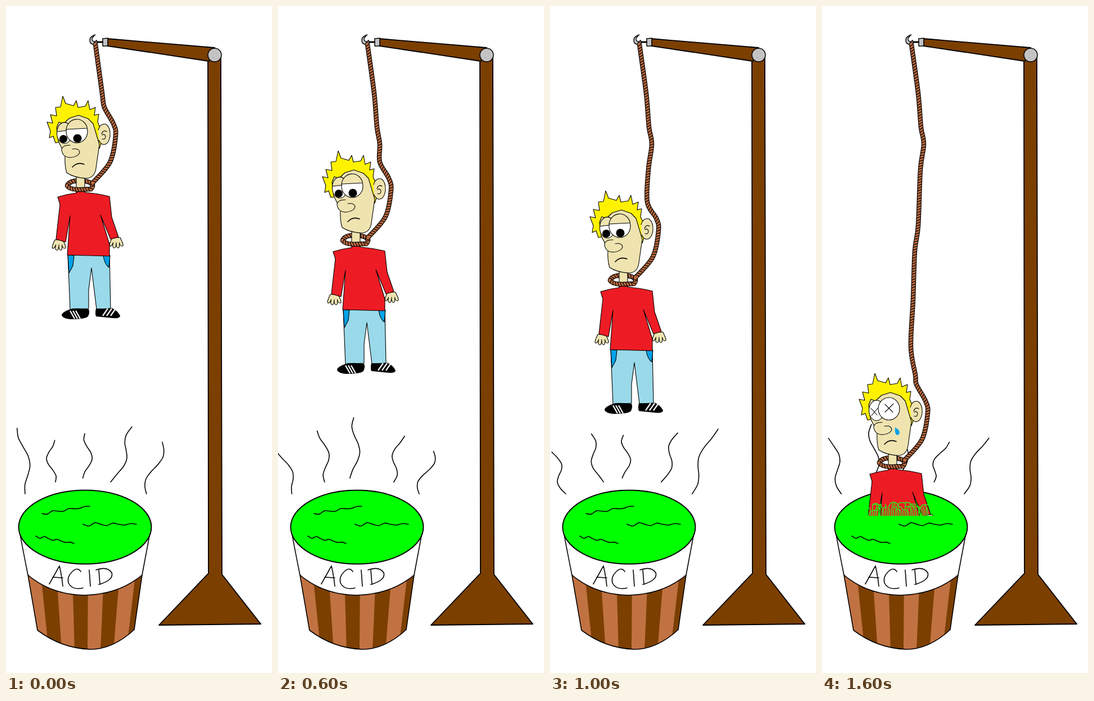
Recreate the animation shown at these times as an HTML page. Size 473 by 1184 pixels, loop 1.8 s.

```html
<!DOCTYPE html>
<html lang="en">
<head>
<meta charset="utf-8">
<title>Acid bucket</title>
<style>
  html, body { margin: 0; width: 100%; height: 100%; overflow: hidden; background: #fff; }
  svg { display: block; width: 100vw; height: 100vh; }
  .ink { fill: none; stroke: #000; stroke-width: 1.6; stroke-linecap: round; stroke-linejoin: round; }
  .thin { stroke: #000; stroke-width: 1.1; stroke-linejoin: round; stroke-linecap: round; }
  .post { fill: #7b3f00; stroke: #000; stroke-width: 1.8; stroke-linejoin: round; }
  .steel { fill: #c3c3c3; stroke: #000; stroke-width: 1.5; }
  .skin { fill: #efe4b0; }
  .none { fill: none; }
</style>
</head>
<body>
<svg viewBox="0 0 473 1184" preserveAspectRatio="none">
  <defs>
    <clipPath id="dip"><rect x="0" y="100" width="300" height="313"/></clipPath>
    <clipPath id="wood"><path d="M39 1010Q80 1045 140 1046Q202 1044 242 1010L228 1107Q190 1142 150 1142Q98 1140 56 1108Z"/></clipPath>
  </defs>

  <g id="gallows">
    <path class="post" d="M359 90H382L384 1009L453 1097L272 1099L360 1007Z"/>
    <path class="post" d="M181 58L371 74L361 98L181 71Z"/>
    <circle class="steel" cx="371" cy="87" r="12"/>
    <path class="steel" d="M172 58L181 57V71H172Z"/>
    <path d="M162 64H172" stroke="#000" stroke-width="3"/>
    <path class="steel" d="M159 51Q146 55 150 65Q156 72 163 65L161 61Q156 66 153 60Q153 55 159 51Z"/>
  </g>

  <path id="steam" class="ink"/>

  <g id="bucket">
    <path d="M23 925L39 1010Q80 1045 140 1046Q202 1044 242 1010L258 925Z" fill="#fff"/>
    <g id="staves" clip-path="url(#wood)"><rect x="30" y="1000" width="220" height="150" fill="#c17242"/></g>
    <path class="ink" d="M39 1010Q80 1045 140 1046Q202 1044 242 1010"/>
    <path class="ink" d="M23 925Q25 940 39 1010L56 1108Q98 1140 150 1142Q190 1142 228 1107L242 1010L258 925"/>
    <ellipse cx="140.5" cy="925" rx="118" ry="65.5" fill="#0f0" stroke="#000" stroke-width="1.9"/>
    <path id="wave" class="ink"/>
    <path id="ripples" class="ink"/>
    <path class="ink" role="img" aria-label="ACID" d="M77 1026L95 994Q99 1010 101 1030M83 1014L101 1015
      M133 1004Q128 996 120 1002Q108 1012 111 1024Q118 1038 137 1033M148 1001L150 1030
      M165 1001L167 1026M160 1001Q180 994 188 1006Q192 1019 165 1027"/>
  </g>

  <g id="man">
    <g id="backLoop"></g>
    <g id="body">
      <path id="hands" class="skin thin"/>
      <path class="thin" fill="#99d9ea" d="M110 442L114 539L147 537V503L152 465L161 538L186 537L184 442Z"/>
      <path class="thin" fill="#00a2e8" d="M110 442L121 443L119 461L112 474ZM173 443H185L183 464Q175 458 173 443Z"/>
      <path d="M147 538Q130 536 118 537Q99 543 99 549Q102 556 118 556Q138 556 145 552Q150 545 147 538Z
        M160 537Q158 545 160 551L190 554Q203 555 203 550Q199 541 188 536Q174 538 160 537Z"/>
      <path id="laces" stroke="#fff" stroke-width="2.2"/>
      <path class="skin thin" d="M125 300V333H140V300Z"/>
      <path class="thin" fill="#ed1c24" d="M92 339Q108 334 124 332L128 329H138L141 331Q164 333 184 338L188 375L200 410L186 414L168 371L184 423V444L109 442L114 372L106 419L89 414L96 352Z"/>
    </g>
    <path class="thin" fill="#fff200" d="M88 243L84 231L77 234L79 222L73 206L83 208L79 193L90 195L88 180L97 179L101 160L106 173L120 177L125 168L128 180L141 178L146 168L149 184L159 180L157 194L165 192L163 206L168 218L171 238L166 253L157 230Z"/>
    <path class="skin thin" d="M90 216L94 206L102 209L113 199L129 194L146 200L155 209L166 246L160 288Q158 304 144 306Q121 305 108 296Q104 284 105 264L93 240Z"/>
    <path class="skin thin" d="M164 220Q168 207 178 210Q186 216 185 230Q183 246 173 246Q167 244 165 238"/>
    <path class="thin none" d="M170 227Q173 219 179 223M171 236Q177 238 177 231Q175 226 171 229"/>
    <g class="thin">
      <ellipse cx="104" cy="226" rx="13.5" ry="18" fill="#fff"/>
      <path class="skin lids" d="M90.5 223A13.5 18 0 0 1 117 220Z"/>
      <circle class="lids" cx="102" cy="236" r="6.5"/>
      <ellipse cx="126" cy="223" rx="19" ry="20" fill="#fff"/>
      <path class="skin lids" d="M107 219A19 20 0 0 1 144.5 217Z"/>
      <circle class="lids" cx="127" cy="235" r="7"/>
      <path id="crosses" d="M94 222L105 234M106 222L95 235M119 215L133 229M134 214L119 229"/>
    </g>
    <path class="skin thin" d="M114 247Q99 247 99 256Q101 269 115 269Q130 267 131 259Q129 252 118 254"/>
    <path class="ink" d="M118 286Q127 276 139 281"/>
    <path id="tear" fill="#00a2e8" d="M-4 -7Q4 -3 4 3Q2 8 -2 6Q-5 2 -4 -7Z"/>
    <g id="frontLoop"></g>
  </g>
  <g id="rope"></g>
  <path id="splash" fill="none" stroke="#35e01a" stroke-width="1.6"/>
</svg>

<script>
const STEP = 200, LOOP = 1800;
const { sin, PI } = Math;
const $ = id => document.getElementById(id);
const draw = (id, d) => $(id).setAttribute("d", d);
const range = (n, fn) => Array.from({ length: n }, (_, i) => fn(i));
const show = (el, on) => el.style.display = on ? "" : "none";
const make = (attrs, parent) => {
  const el = document.createElementNS("http://www.w3.org/2000/svg", "path");
  for (const k in attrs) el.setAttribute(k, attrs[k]);
  return parent.appendChild(el);
};
const random = seed => () => (seed = seed * 16807 % 2147483647) / 2147483647;

// Smooth curve through the points
function curve(p) {
  let d = `M${p[0]}`;
  for (let i = 0; i < p.length - 1; i++) {
    const a = p[i - 1] || p[i], b = p[i], c = p[i + 1], e = p[i + 2] || c;
    d += `C${b[0] + (c[0] - a[0]) / 6},${b[1] + (c[1] - a[1]) / 6} ` +
         `${c[0] - (e[0] - b[0]) / 6},${c[1] - (e[1] - b[1]) / 6} ${c}`;
  }
  return d;
}

// Twisted cord along a path
function cord(parent, d) {
  parent.replaceChildren();
  const base = { d, fill: "none", "stroke-linecap": "round" };
  const line = make({ ...base, stroke: "#000", "stroke-width": 8.4 }, parent);
  make({ ...base, stroke: "#bd6b3f", "stroke-width": 6.2 }, parent);
  let ticks = "";
  for (let s = 2, len = line.getTotalLength(); s < len - 1; s += 4.8) {
    const p = line.getPointAtLength(s), q = line.getPointAtLength(s + 1);
    const tx = q.x - p.x, ty = q.y - p.y;
    const dx = tx * 1.6 - ty * 3.6, dy = ty * 1.6 + tx * 3.6;
    ticks += `M${p.x - dx} ${p.y - dy}L${p.x + dx} ${p.y + dy}`;
  }
  make({ d: ticks, stroke: "#000", "stroke-width": 1.3 }, parent);
}

// Rope: a fixed hanging part, then a bend that travels with the man
const hang = [[159, 68], [171, 155], [176, 215], [181, 245], [175, 290], [171, 390], [165, 435], [162, 520], [158, 605], [166, 655]];
const bend = [[175, 180], [191, 209], [195, 230], [185, 277], [154, 314]];

// Keys of the lowering: step, x, y
const keys = [[0, 0, 0], [2, 3, 57], [3, 6, 97], [5, -2, 168], [7, -9, 281], [8, -7, 492]];
function drop(step) {
  const n = Math.max(1, keys.findIndex(k => k[0] >= step));
  const [a, b] = [keys[n - 1], keys[n]], f = (step - a[0]) / (b[0] - a[0]);
  return [1, 2].map(j => a[j] + (b[j] - a[j]) * f);
}

// Five wisps fan out from the rim, redrawn at every step
function vapour(step) {
  const rnd = random(step * 911 + 37);
  rnd();
  return range(5, k => {
    const x = 35 + 54 * k + (rnd() - .5) * 18, y = 838 + 7 * (k - 2) ** 2;
    const lean = (k - 1.5) * 16 + (rnd() - .5) * 20, rise = 68 + rnd() * 50, turn = rnd() * 2 * PI;
    return curve(range(8, i => {
      const u = i / 7;
      return [x + lean * u + 8 * sin(turn + u * 7), y - rise * u];
    }));
  }).join("");
}

const ripple = (x, y, w, rise, amp) => curve(range(10, i =>
  [x + w * i / 9, y - rise * i / 9 + amp * sin(i * 2.1) * (1 - i / 12)]));

function hand(x, y) {
  return `M${x - 7} ${y}` + range(4, i => {
    const tx = x + (i - 1.5) * 7, ty = y + 13 + 6 * sin(PI * (i + .5) / 4);
    return `Q${tx - 4} ${ty} ${tx} ${ty}Q${tx + 3} ${ty} ${x + (i - 1) * 5.5} ${y + 9}`;
  }).join("") + `L${x + 7} ${y}Z`;
}

// Blades of liquid over the sinking shirt
function blades() {
  const rnd = random(7);
  return range(32, i => {
    const x = 83 + i * 3.4, h = 12 + rnd() * 18;
    const tip = Math.max(82, Math.min(190, x + (rnd() - .5) * 44));
    return `M${x} 905Q${x} ${905 - h} ${tip} ${905 - h * .8}`;
  }).join("");
}

for (let k = 0; k < 8; k += 2)
  make({ d: `M${62 + 28 * k} 1010h28L${99 + 23 * k} 1145h-23Z`, fill: "#7b3f00" }, $("staves"));
draw("wave", ripple(64, 901, 85, 13, 3));
draw("ripples", ripple(137, 920, 95, 0, 4) + ripple(53, 941, 68, -13, 3));
draw("hands", hand(94, 415) + hand(196, 411));
draw("laces", range(3, i => `M${114 + 5 * i} 541l8 14M${172 + 7 * i} 550l9 -13`).join(""));
draw("splash", blades());
cord($("backLoop"), "M109 319Q112 310 131 310Q151 311 153 317");
cord($("frontLoop"), "M109 319Q113 326 132 326L151 325Q156 320 153 315");

function pose(step) {
  const [dx, dy] = drop(step), sunk = step === 8;
  $("man").setAttribute("transform", `translate(${dx} ${dy})`);
  const low = bend.map(([x, y]) => [x + dx, y + dy]);
  cord($("rope"), curve([...hang.filter(p => p[1] < dy + 168), ...low]));
  draw("steam", vapour(step));
  $("body").setAttribute("clip-path", sunk ? "url(#dip)" : "none");
  document.querySelectorAll(".lids").forEach(el => show(el, !sunk));
  show($("crosses"), sunk);
  show($("splash"), sunk);
  show($("wave"), !sunk);
  show($("tear"), step >= 7);
  $("tear").setAttribute("transform", sunk ? "translate(141 263)" : "translate(136 252)");
}

let last = -1;
function tick() {
  const step = Math.floor(performance.now() % LOOP / STEP);
  if (step !== last) pose(last = step);
  requestAnimationFrame(tick);
}
tick();
</script>
</body>
</html>
```
